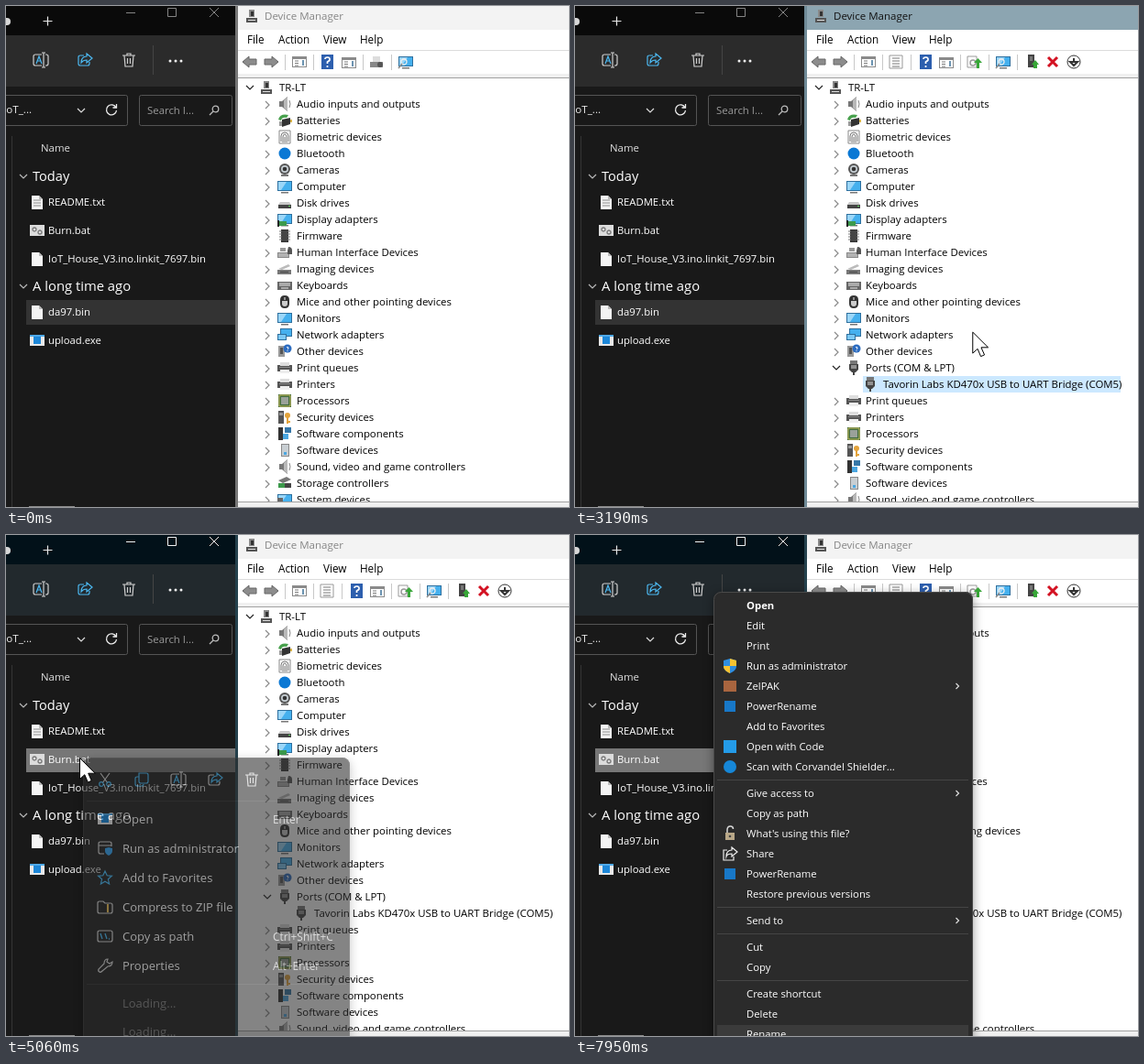
An HTML page with a canvas that plays this animation: 614x547 px, repeating every 8000 ms.

```html
<!DOCTYPE html>
<html lang="en">
<head>
<meta charset="utf-8">
<title>Device list and file menu</title>
<style>
html, body { margin: 0; width: 100%; height: 100%; overflow: hidden; background: #191919; }
canvas { display: block; }
</style>
</head>
<body>
<canvas id="stage" width="614" height="547"></canvas>
<script>
const W = 614, H = 547, LOOP = 8000;
const stage = document.getElementById('stage');
const spare = Object.assign(document.createElement('canvas'), { width: W, height: H });
const main = stage.getContext('2d'), extra = spare.getContext('2d');
let g = main;

const FONT = '"Open Sans", "Noto Sans", sans-serif';
const BLUE = '#4cb8f0', PALE = '#d0d0d0';

const circle = (r, x = 0, y = 0) => `M${x - r} ${y}a${r} ${r} 0 1 0 ${2 * r} 0a${r} ${r} 0 1 0 ${-2 * r} 0z`;
const box = (x, y, w, h) => `M${x} ${y}h${w}v${h}h${-w}z`;

// Each icon is a list of [colour, path, stroke width]; no width means filled.
const screen = [['#2d6f9e', box(-8, -6, 16, 11)], ['#45b0ee', box(-7, -5, 14, 9)], ['#9bd6f8', 'M-7-5h9l-6 9h-3z'], ['#777', box(-4, 6, 8, 1.5)]];
const printer = [['#555', box(-8, -3, 16, 7)], ['#ddd', box(-5, -6, 10, 4)], ['#eee', box(-5, 2, 10, 4)], ['#888', box(-6, -1, 12, 1)]];
const plug = [['#444', 'M-5-4h10v6l-3 3h-4l-3-3z'], ['#777', box(-4, -8, 8, 4)], ['#444', box(-1, 4, 2, 4)], ['#ddd', 'M-2-3v4M0-3v4M2-3v4', 1]];
const shield = [['#2f8ee0', 'M0-8l7 2v6c0 4-3 6-7 8c-4-2-7-4-7-8v-6z'], ['#f7c331', 'M0-8l7 2v6h-7zM0 0v8c-4-2-7-4-7-8z']];
const rename = c => [[c, 'M1-6h-7q-2 0-2 2v8q0 2 2 2h7M5-6h1q2 0 2 2v8q0 2-2 2h-1M3-8v16M1-8h4M1 8h4', 1.2], [BLUE, 'M-5 4l3-8l3 8M-4 1h4', 1.2]];
const share = c => [[c, 'M-1-5h-4q-2 0-2 2v7q0 2 2 2h8q2 0 2-2v-2', 1.2], [BLUE, 'M2-7l6 5l-6 5v-3q-4 0-6 3q0-7 6-7z', 1.2]];
const trash = [[PALE, 'M-7-5h14M-2-5v-2h4v2M-5-5l1 12h8l1-12M-1.5-2v6M1.5-2v6', 1.2]];
const page = [['#f4f4f4', 'M-6-7h8l4 4v11h-12z'], ['#bbb', 'M2-7v4h4z']];
const list = [['#8a8a8a', box(-8, -6, 16, 12)], ['#fff', box(-7, -3, 14, 8)], ['#777', 'M-5-1h4M-5 1.5h4M-5 4h4', 1], ['#6c93b0', 'M4-2v6', 2]];

const ICONS = {
  screen, printer, plug, shield, trash, page, list,
  audio: [['#777', 'M-6-3h3l6-5v16l-6-5h-3z'], ['#b9b9b9', 'M-1-4l4-4v16l-4-4z'], ['#888', 'M5-4q2 4 0 8', 1]],
  battery: [['#333', 'M-3-1l9-2v7l-9 3z'], ['#48a14d', 'M-7-1q2-7 11-5l-2 3q-5-1-6 3z'], ['#999', box(-6, 1, 3, 5)], ['#d9b44a', box(6, -1, 2, 3)]],
  finger: [['#888', box(-6, -7, 12, 14), 1], ['#777', 'M-4 5v-6q0-4 4-4q4 0 4 4v6M-2 6v-6q0-3 2-3q2 0 2 3v6M0 0v6', 1]],
  dot: [['#0a78d4', circle(6.5)]],
  camera: [['#555', circle(6, 0, -1)], ['#c5cdd2', circle(4, 0, -1)], ['#333', circle(2.3, 0, -1)], ['#777', box(-4, 5, 8, 2)]],
  disk: [['#c9c9c9', 'M-5-1h10l2 3h-14z'], ['#444', box(-7, 2, 14, 4)], ['#5bd35b', box(4, 3, 2, 1)]],
  display: [...screen, ['#3c9a4c', box(-6, 2, 8, 5)], ['#222', box(-8, 1, 2, 7)]],
  chip: [['#333', box(-4, -7, 8, 14)], ['#777', 'M-6-5h12M-6-2h12M-6 1h12M-6 4h12', 1], ['#444', box(-3, -6, 6, 12)]],
  hid: [['#888', box(-8, 0, 13, 6)], ['#ddd', 'M-7 2h11M-7 4h11', 1], ['#555', 'M4-6q4 0 4 4v4h-5v-4z'], ['#999', box(-5, -5, 6, 4)]],
  imaging: [['#777', box(-8, 1, 15, 5)], ['#bbb', 'M-7 0l11-5l2 2l-9 4z'], ['#444', box(-5, 3, 9, 1)]],
  keys: [['#666', box(-8, -4, 16, 9)], ['#eee', 'M-6-2h12M-6 0h12M-4 3h8', 1]],
  mouse: [['#333', 'M0-7q5 0 5 5v4q0 5-5 5q-5 0-5-5v-4q0-5 5-5z'], ['#ccc', 'M-3-1v3q0 3 3 3q3 0 3-3v-3z'], ['#eee', 'M0-5v3', 1]],
  network: [['#2d6f9e', box(-5, -7, 13, 9)], ['#45b0ee', box(-4, -6, 11, 7)], ['#2d6f9e', box(-8, -1, 10, 7)], ['#7cc9f5', box(-7, 0, 8, 5)]],
  other: [['#999', box(-7, -6, 7, 12)], ['#555', box(-5, -4, 3, 7)], ['#2c6cc0', circle(4.5, 3, -3)], ['#fff', 'M2-4q1-2 2 0q0 1-1 2M3-1v1', 1]],
  cpu: [['#3f6b3e', box(-7, -7, 14, 14)], ['#d0c060', box(-6, -6, 12, 12), 1], ['#9aa19a', box(-4, -4, 8, 8)]],
  security: [['#555', box(-7, -7, 6, 14)], ['#999', box(-6, -5, 4, 3)], ['#e3a33b', circle(3, 3, -2)], ['#e3a33b', 'M3 0v7M3 5h3', 2]],
  parts: [['#3577a8', box(0, -7, 7, 6)], ['#333', box(-7, -7, 5, 14)], ['#4aa6e0', box(-2, 0, 6, 6)]],
  tower: [['#888', box(-4, -7, 9, 14)], ['#c8ced2', box(-3, -6, 7, 12)], ['#4aa6e0', box(-1, 2, 3, 3)]],
  storage: [['#777', 'M-7-3l9-4l5 3l-9 4z'], ['#3c9a4c', box(-7, 0, 8, 5)], ['#444', box(0, 0, 7, 5)]],
  system: [...screen, ['#666', box(-8, -2, 6, 9)]],
  pc: [['#555', box(-6, 2, 12, 5)], ['#888', box(-3, -7, 6, 8)], ['#333', box(-1, -5, 3, 5)], ['#ddd', box(-4, 4, 8, 1)]],
  back: [['#8c8c8c', 'M-8 0l7-6v3h8v6h-8v3z'], ['#666', 'M-8 0l7-6v3h8v6h-8v3z', 1]],
  next: [['#8c8c8c', 'M8 0l-7-6v3h-8v6h8v3z'], ['#666', 'M8 0l-7-6v3h-8v6h8v3z', 1]],
  help: [['#2d5fae', box(-6, -8, 13, 16)], ['#fff', 'M-2-3q0-2 2.5-2q3 0 2.5 3q-.5 1-2.5 2v2M.5 4v2', 1.7]],
  props: [['#999', box(-7, -7, 14, 14), 1], ['#777', 'M-4-4h8M-4-1h8M-4 2h8M-4 5h8', 1]],
  scanner: [['#888', box(-7, 0, 14, 6)], ['#ddd', box(-4, -6, 8, 6)], ['#555', circle(3, 4, 3)]],
  update: [['#999', box(-7, -6, 10, 12), 1], ['#999', circle(3, -1, 1), 1.5], ['#37a637', 'M3 7v-6h-3l4.500-5l4.500 5h-3v6z']],
  scan: [...screen, ['#eee', circle(3, -2, 0), 1.3], ['#888', 'M-4 2l-4 5', 1.5]],
  enable: [['#444', box(-5, -8, 7, 14)], ['#777', box(-3, -6, 3, 5)], ['#37a637', 'M1 7v-4h-2l4-5l4 5h-2v4z']],
  cross: [['#d31222', 'M-5-5l10 10M5-5l-10 10', 3]],
  down: [['#333', circle(7), 1], ['#333', 'M0-4v4M-4 0h8l-4 4z', 2]],
  text: [...page, ['#8a8a8a', 'M-4-2h8M-4 1h8M-4 4h8', 1]],
  batch: [['#dcdcdc', box(-8, -6, 16, 12)], ['#777', circle(2, -3, -1), 1.3], ['#777', circle(2, 3, 2), 1.3]],
  app: [['#e8e8e8', box(-8, -6, 16, 12)], ['#1d87d8', box(-4, -4, 8, 8)], ['#4fa9e8', 'M-8-5h16', 2]],
  rename: rename(PALE), share: share(BLUE), shareMenu: share(PALE),
  cut: [[PALE, 'M-5-7l8 11M5-7l-8 11', 1.2], [BLUE, circle(2.3, -4, 5), 1.2], [BLUE, circle(2.3, 4, 5), 1.2]],
  copy: [[BLUE, 'M-3-7h8q2 0 2 2v7q0 2-2 2h-6q-2 0-2-2z', 1.2], [BLUE, 'M-3-3h-2q-2 0-2 2v6q0 2 2 2h5q2 0 2-2', 1.2]],
  admin: [[PALE, 'M7-2v-3q0-2-2-2h-10q-2 0-2 2v9q0 2 2 2h4M-7-3h14', 1.2], ['#3aa0e8', 'M4-1l4 1v3q0 3-4 5q-4-2-4-5v-3z']],
  star: [[BLUE, 'M0-7l2.200 4.800l5.200.500l-4 3.500l1.200 5.200l-4.600-2.800l-4.600 2.800l1.200-5.200l-4-3.500l5.200-.500z', 1.2]],
  zip: [[PALE, 'M-8-4q0-2 2-2h4l2 2h6q2 0 2 2v7q0 2-2 2h-12q-2 0-2-2z', 1.2], ['#e0b85a', 'M3-3v9', 2]],
  path: [[PALE, 'M-6-6h12q2 0 2 2v8q0 2-2 2h-12q-2 0-2-2v-8q0-2 2-2z', 1.2], [BLUE, 'M-5-3l2 6M0-3l2 6M4 3h1', 1.3]],
  wrench: [[PALE, 'M3-7q-4 0-4 5l-6 6q-1 2 1 3q1 1 3-1l6-5q5 0 5-5l-3 2l-3-2z', 1.2]],
  tile: [['#1878c8', box(-6, -6, 12, 12)]],
  pack: [['#a9653f', box(-7, -6, 14, 12)]],
  code: [['#249be8', box(-7, -7, 14, 14)]],
  guard: [['#1687d8', circle(7)]],
  lock: [['#d8d8d8', 'M-3-1v-3q0-4 3.500-4q3 0 3 3', 1.5], ['#b9a888', box(-5, -1, 10, 8)], ['#444', circle(1.3, 0, 3)]],
  send: [['#eee', 'M-3-4h-4v11h11v-4M2-7l6 5l-6 5v-3q-5 0-6 3q0-7 6-7z', 1.2]]
};

const paths = new Map();
function pathOf(d) {
  if (!paths.has(d)) paths.set(d, new Path2D(d));
  return paths.get(d);
}
function draw(d, x, y, color, width) {
  g.save();
  g.translate(x, y);
  if (width) { g.lineWidth = width; g.strokeStyle = color; g.stroke(pathOf(d)); }
  else { g.fillStyle = color; g.fill(pathOf(d)); }
  g.restore();
}
const icon = (name, x, y) => ICONS[name].forEach(([c, d, w]) => draw(d, x, y, c, w));
function rect(x, y, w, h, color) { g.fillStyle = color; g.fillRect(x, y, w, h); }
function round(x, y, w, h, r, fill, edge) {
  g.beginPath();
  g.roundRect(x, y, w, h, r);
  if (fill) { g.fillStyle = fill; g.fill(); }
  if (edge) { g.lineWidth = 1; g.strokeStyle = edge; g.stroke(); }
}
function text(s, x, y, color = '#000', size = 11.4, weight = 400) {
  g.font = `${weight} ${size}px ${FONT}`;
  g.fillStyle = color;
  g.fillText(s, x, y + size * 0.36);
}
const chevron = (x, y, open, color, s = 4) =>
  draw(open ? `M${-s} ${-s / 2}l${s} ${s}l${s} ${-s}` : `M${-s / 2} ${-s}l${s} ${s}l${-s} ${s}`, x, y, color, 1.2);

function panel(x, y, w, fill, edge) {
  g.save();
  g.shadowColor = 'rgba(0,0,0,.4)';
  g.shadowBlur = 12;
  g.shadowOffsetY = 3;
  round(x, y, w, H, 8, fill);
  g.restore();
  round(x + .5, y + .5, w - 1, H, 8, null, edge);
}

// Draws a group with one shared opacity.
function group(alpha, paint) {
  extra.clearRect(0, 0, W, H);
  g = extra;
  paint();
  g = main;
  g.globalAlpha = alpha;
  g.drawImage(spare, 0, 0);
  g.globalAlpha = 1;
}

const FILES = [
  ['README.txt', 'text', 214], ['Burn.bat', 'batch', 245], ['IoT_House_V3.ino.linkit_7697.bin', 'page', 276],
  ['da97.bin', 'page', 334], ['upload.exe', 'app', 365]
];

function explorer(t) {
  const active = t >= 4730, ctl = active ? '#f2f2f2' : '#858585';
  rect(0, 0, 251, H, '#191919');
  rect(0, 0, 251, 32, active ? '#021119' : '#0a0a0a');
  rect(0, 32, 251, 56, active ? '#22292d' : '#2b2b2b');
  draw(circle(4), 1, 17, '#d8d8d8');
  draw('M-5 0h10M0-5v10', 45.5, 16.5, '#e8e8e8', 1.2);
  draw('M-5 0h10', 136, 7.5, ctl, 1);
  draw(box(-4.5, -4.5, 9, 9), 181, 7, ctl, 1);
  draw('M-5-5l10 10M5-5l-10 10', 227, 7, ctl, 1);
  icon('rename', 38, 59);
  icon('share', 86, 59);
  icon('trash', 134, 59);
  rect(160, 43, 1, 32, '#454545');
  [179, 185, 191].forEach(x => draw(circle(1.5), x, 60, '#f0f0f0'));

  round(-8.5, 97.5, 141, 33, 2, '#191919', '#555');
  round(145.5, 97.5, 101, 33, 2, '#191919', '#555');
  text('IoT_...', -3, 113, '#eee', 11.6);
  chevron(82, 114, true, '#ddd');
  draw('M5-2a5.500 5.500 0 1 0 .5 3M5.500-6v4h-4', 115, 113, '#eee', 1.3);
  text('Search I...', 154, 114, '#9a9a9a', 11.4);
  draw(circle(3.3, 1.5, -1.5) + 'M-1 1l-4 4', 227, 114, '#bbb', 1.3);

  rect(6, 142, 1, H, '#353535');
  text('Name', 38, 155, '#e0e0e0');
  chevron(19, 186, true, '#bbb');
  text('Today', 29, 186, '#fff', 14.6);
  chevron(19, 306, true, '#bbb');
  text('A long time ago', 29, 306, '#fff', 14.8);

  if (t < 4400) rect(22, 321, 228, 27, '#333');
  if (t >= 3680 && t < 3810) rect(22, 201, 228, 28, '#2b2b2b');
  if (t >= 3870) {
    const bright = (t >= 4400 && t < 5130) || t >= 7690;
    rect(22, 233, 228, 26, t < 4400 ? '#2b2b2b' : bright ? '#777' : '#333');
  }
  FILES.forEach(([name, kind, y]) => {
    icon(kind, 34, y);
    text(name, 46, y, '#fff', 11.3);
  });
  rect(25, 546, 50, 1, '#8a8a8a');
}

const DEVICES = [
  ['Audio inputs and outputs', 'audio'], ['Batteries', 'battery'], ['Biometric devices', 'finger'], ['Bluetooth', 'dot'],
  ['Cameras', 'camera'], ['Computer', 'screen'], ['Disk drives', 'disk'], ['Display adapters', 'display'], ['Firmware', 'chip'],
  ['Human Interface Devices', 'hid'], ['Imaging devices', 'imaging'], ['Keyboards', 'keys'],
  ['Mice and other pointing devices', 'mouse'], ['Monitors', 'screen'], ['Network adapters', 'network'], ['Other devices', 'other'],
  ['Print queues', 'printer'], ['Printers', 'printer'], ['Processors', 'cpu'], ['Security devices', 'security'],
  ['Software components', 'parts'], ['Software devices', 'tower'], ['Sound, video and game controllers', 'audio'],
  ['Storage controllers', 'storage'], ['System devices', 'system']
];
const PORT_ROW = 16;
const BARS = [
  { icons: { back: 266, next: 289, list: 320, help: 350, scanner: 404, scan: 436 }, lists: [374], seps: [304, 335, 389, 420] },
  { icons: { back: 266, next: 289, list: 320, props: 350, help: 382, update: 435, scan: 467, enable: 499, cross: 521, down: 544 },
    lists: [405], seps: [304, 335, 366, 420, 451, 482] }
];

function tree(t) {
  const selected = t >= 2310 && t < 4400;
  if (t >= 2310 && t < 2380) rect(296, 80, 38, 18, '#cce8ff');
  chevron(266, 89, true, '#222');
  icon('pc', 284, 89);
  text('TR-LT', 298, 89);
  if (t >= 950 && t < 1020) return;
  const hasPort = t >= 1020;
  DEVICES.forEach(([name, kind], i) => {
    const y = 107 + 18 * (i + (hasPort && i >= PORT_ROW ? 2 : 0));
    chevron(285, y + 1, false, '#8a8a8a');
    icon(kind, 304, y);
    text(name, 317, y);
  });
  if (!hasPort) return;
  chevron(285, 395, true, '#222');
  icon('plug', 304, 395);
  text('Ports (COM & LPT)', 317, 395);
  if (selected) rect(314, 404, 281, 18, '#cce8ff');
  icon('plug', 322, 413);
  text('Tavorin Labs KD470x USB to UART Bridge (COM5)', 336, 413);
}

function manager(t) {
  const active = t >= 2310 && t < 4400;
  rect(251, 0, W, H, '#fff');
  rect(251, 0, W, 26, active ? '#8ca5b1' : '#f3f3f3');
  rect(250, 0, 3, H, active ? '#6f8a97' : t >= 4730 ? '#24414d' : '#777');
  icon('pc', 268, 11);
  text('Device Manager', 282, 11, active ? '#111' : '#858585', 11.5);
  [['File', 263], ['Action', 297], ['View', 346], ['Help', 386]].forEach(([s, x]) => text(s, x, 37, '#000', 11.7));
  rect(253, 48, W, 1, '#dcdcdc');
  rect(253, 74, W, 4, '#f0f0f0');
  rect(253, 78, W, 1, '#a0a0a0');
  const bar = BARS[t >= 2380 ? 1 : 0];
  Object.entries(bar.icons).forEach(([name, x]) => icon(name, x, 61));
  bar.lists.forEach(x => icon('list', x, 62));
  bar.seps.forEach(x => rect(x, 53, 1, 17, '#c8c8c8'));

  g.save();
  g.beginPath();
  g.rect(253, 79, W, 462);
  g.clip();
  tree(t);
  g.restore();
  rect(253, 541, W, 1, '#a0a0a0');
  rect(253, 542, W, 5, '#f0f0f0');
}

const ACTIONS = [
  ['Open', 'app', 310, 'Enter'], ['Run as administrator', 'admin', 342], ['Add to Favorites', 'star', 374],
  ['Compress to ZIP file', 'zip', 406], ['Copy as path', 'path', 438, 'Ctrl+Shift+C'], ['Properties', 'wrench', 470, 'Alt+Enter'],
  ['PowerRename', 'tile', 511], ['ZelPAK', 'pack', 542]
];

function shortMenu(t, hoverY) {
  panel(84, 243, 291, '#2c2c2c', '#3c3c3c');
  ['cut', 'copy', 'rename', 'shareMenu', 'trash'].forEach((name, i) => icon(name, 108 + 40 * i, 267));
  rect(88, 290, 283, 1, '#3d3d3d');
  rect(88, 490, 283, 1, '#3d3d3d');
  ACTIONS.forEach(([name, kind, y, keys], i) => {
    if (Math.abs(hoverY - y) < 15) round(90, y - 14, 279, 28, 4, '#383838');
    if (i > 5 && t < 5550) return text('Loading...', 127, y, '#858585', 13);
    icon(kind, 108, y);
    text(name, 127, y, '#fff', 13);
    if (keys) text(keys, 291, y + 1, '#c8c8c8', 11.9);
  });
  if (t >= 5550) chevron(353, 543, false, '#ccc');
}

const COMMANDS = [
  ['Open', 77], ['Edit', 99], ['Print', 121], ['Run as administrator', 143, 'shield'], ['ZelPAK', 165, 'pack', true],
  ['PowerRename', 187, 'tile'], ['Add to Favorites', 209], ['Open with Code', 231, 'code'],
  ['Scan with Corvandel Shielder...', 253, 'guard'], ['Give access to', 282, '', true], ['Copy as path', 304],
  ["What's using this file?", 326, 'lock'], ['Share', 348, 'send'], ['PowerRename', 370, 'tile'],
  ['Restore previous versions', 392], ['Send to', 421, '', true], ['Cut', 450], ['Copy', 472],
  ['Create shortcut', 501], ['Delete', 523], ['Rename', 545]
];

function longMenu(t) {
  panel(151, 62, 283, '#2b2b2b', '#4a4a4a');
  [267, 406, 435, 486].forEach(y => rect(155, y, 274, 1, '#454545'));
  if (t >= 7950) rect(155, 535, 274, 20, '#3b3b3b');
  COMMANDS.forEach(([name, y, kind, more], i) => {
    if (kind) icon(kind, 169, y);
    text(name, 187, y, '#fff', 11.3, i ? 400 : 700);
    if (more) chevron(417, y, false, '#ddd', 3);
  });
}

// Pointer path: time, x, y.
const TRACK = [
  [500, 483, 494], [1590, 483, 494], [2170, 577, 411], [2519, 577, 411], [2520, 574, 411], [2950, 574, 411],
  [3610, 109, 228], [3680, 96, 224], [3770, 96, 224], [3870, 80, 243], [5400, 80, 243], [5470, 100, 259],
  [5940, 183, 470], [6419, 183, 470], [6420, 183, 475], [6790, 183, 475], [7020, 183, 560]
];
function pointer(t) {
  const i = TRACK.findIndex(k => k[0] > t);
  if (i < 1) return null;
  const [t0, x0, y0] = TRACK[i - 1], [t1, x1, y1] = TRACK[i];
  const u = (t - t0) / (t1 - t0), e = u * u * (3 - 2 * u);
  return { x: x0 + (x1 - x0) * e, y: y0 + (y1 - y0) * e };
}
const ARROW = 'M.5.500v23l5.300-4.800l3.500 8.300l4-1.700l-3.600-8.100h7.600z';

function render(t) {
  const p = pointer(t);
  explorer(t);
  manager(t);
  if (t >= 5060 && t < 7560) {
    const alpha = t < 5130 ? 0.58 : t < 7490 ? 1 : 0.4;
    group(alpha, () => shortMenu(t, p && t >= 5470 ? p.y : -99));
  }
  if (t >= 7690) longMenu(t);
  if (p) {
    draw(ARROW, p.x, p.y, '#fff');
    draw(ARROW, p.x, p.y, '#000', 1);
  }
}

const start = performance.now();
function tick() {
  render((performance.now() - start) % LOOP);
  requestAnimationFrame(tick);
}
tick();
</script>
</body>
</html>
```
